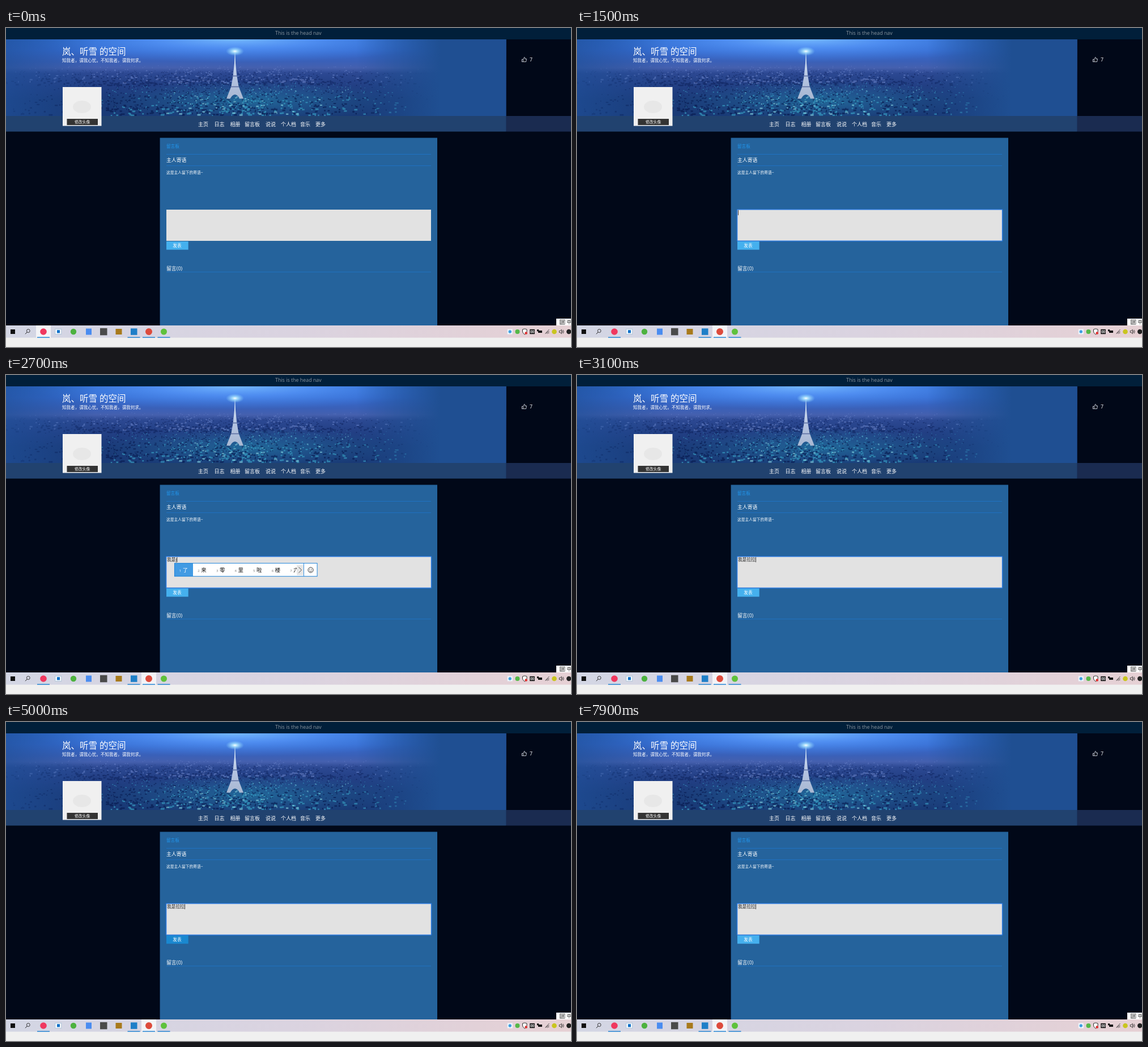
Recreate the animation shown at these times as an HTML page. Size 997x562 px, loop 8 s.

```html
<!DOCTYPE html>
<html lang="zh-CN">
<head>
<meta charset="utf-8">
<title>留言板</title>
<style>
html, body { margin: 0; width: 100%; height: 100%; overflow: hidden; background: #010818; }
svg { display: block; width: 997px; height: 562px; font-family: "Open Sans", "Noto Sans CJK SC", "Noto Sans CJK JP", sans-serif; }
text { white-space: pre; }
</style>
</head>
<body>
<svg id="stage" viewBox="0 0 997 562">
  <defs>
    <linearGradient id="sky" x2="0" y2="1">
      <stop offset="0" stop-color="#2f6cd0"/><stop offset=".12" stop-color="#356bd0"/>
      <stop offset=".24" stop-color="#3a60b8"/><stop offset=".31" stop-color="#4560ae"/>
      <stop offset=".37" stop-color="#2c4892"/><stop offset=".5" stop-color="#223f84"/>
      <stop offset=".65" stop-color="#1a3a78"/><stop offset="1" stop-color="#183a74"/>
    </linearGradient>
    <radialGradient id="glow" gradientUnits="userSpaceOnUse" cx="404" cy="0" r="370" gradientTransform="matrix(1 0 0 .11 0 20)">
      <stop offset="0" stop-color="#74b8ff"/><stop offset=".4" stop-color="#5797fa" stop-opacity=".75"/>
      <stop offset="1" stop-color="#4583e6" stop-opacity="0"/>
    </radialGradient>
    <radialGradient id="streets">
      <stop offset="0" stop-color="#2a98bc" stop-opacity=".5"/><stop offset="1" stop-color="#2a7cb0" stop-opacity="0"/>
    </radialGradient>
    <radialGradient id="star">
      <stop offset="0" stop-color="#fff"/><stop offset=".3" stop-color="#b8f0ff" stop-opacity=".8"/>
      <stop offset="1" stop-color="#8fd8ff" stop-opacity="0"/>
    </radialGradient>
    <linearGradient id="sides">
      <stop offset="0" stop-color="#1f4f98" stop-opacity=".7"/><stop offset=".18" stop-color="#1f4f98" stop-opacity="0"/>
      <stop offset=".7" stop-color="#1f4f92" stop-opacity="0"/><stop offset=".87" stop-color="#1f4f92"/>
      <stop offset="1" stop-color="#1f4f92"/>
    </linearGradient>
    <linearGradient id="tower" x2="0" y2="1">
      <stop offset="0" stop-color="#eaf7ff"/><stop offset=".55" stop-color="#b4c4e2"/><stop offset="1" stop-color="#a9b8d2"/>
    </linearGradient>
    <linearGradient id="bar">
      <stop offset="0" stop-color="#d3d6e4"/><stop offset=".5" stop-color="#dad3e0"/><stop offset="1" stop-color="#e6d0d4"/>
    </linearGradient>
  </defs>
  <g id="page"></g>
  <g id="live"></g>
</svg>
<script>
const $ = id => document.getElementById(id);
const rect = (x, y, w, h, fill, more = '') =>
  `<rect x="${x}" y="${y}" width="${w}" height="${h}" fill="${fill}" ${more}/>`;
const dot = (x, y, r, fill, more = '') => `<circle cx="${x}" cy="${y}" r="${r}" fill="${fill}" ${more}/>`;
const line = (d, color, width = 1) => `<path d="${d}" fill="none" stroke="${color}" stroke-width="${width}"/>`;
// Text placed by the middle of its line
const text = (x, mid, size, str, fill = '#fff', more = '') =>
  `<text x="${x}" y="${mid + size * .37}" font-size="${size}" fill="${fill}" ${more}>${str}</text>`;

let seed = 7;
const rand = () => (seed = seed * 16807 % 2147483647) / 2147483647;

function cityLights() {
  const layer = (color, count, opacity, left, right, top, bottom) => {
    let d = '';
    for (let i = 0; i < count; i++) {
      const depth = rand(), w = 1 + depth * 6 * rand();
      const x = left + (right - left) * (rand() + rand()) / 2, y = top + (bottom - top) * depth;
      d += `M${x.toFixed(1)} ${y.toFixed(1)}h${w.toFixed(1)}v${(.8 + depth * 2).toFixed(1)}h-${w.toFixed(1)}z`;
    }
    return `<path d="${d}" fill="${color}" opacity="${opacity}"/>`;
  };
  return layer('#0a1f58', 700, .5, -60, 740, 74, 100) + layer('#7d94da', 300, .45, -40, 760, 66, 96)
    + layer('#06164a', 800, .6, -20, 760, 92, 152) + layer('#3fb4d4', 420, .55, 100, 740, 96, 153)
    + layer('#8fe0ea', 90, .6, 240, 620, 96, 153);
}

function banner() {
  return rect(0, 20, 882.5, 162, 'url(#sky)') + rect(0, 20, 882.5, 45, 'url(#glow)')
    + '<ellipse cx="430" cy="128" rx="260" ry="36" fill="url(#streets)"/>' + cityLights()
    + rect(0, 20, 882.5, 162, 'url(#sides)')
    + '<path d="M404 38L405 62L407.3 84L410.6 103L419 124.5H412.5Q404 110 395.5 124.5H389L397.4 103L400.7 84L403 62Z" fill="url(#tower)"/>'
    + line('M396.5 103.5H411.5M399.5 84.5H408.5', '#5a6da0', 1.4)
    + '<ellipse cx="404" cy="41" rx="16" ry="8" fill="url(#star)"/>'
    + rect(0, 155, 882.5, 27.5, '#21426f') + rect(882.5, 155, 114.5, 27.5, '#1a2b50');
}

function header() {
  const menu = [[339, '主页'], [367.5, '日志'], [395.5, '相册'], [421, '留言板'], [458, '说说'],
    [485, '个人档'], [519, '音乐'], [546, '更多']];
  return rect(0, 0, 997, 20, '#011f3a')
    + text(475, 8.8, 8.9, 'This is the head nav', '#8b959f')
    + banner()
    + text(99, 41.5, 15.5, '岚、听雪 的空间')
    + text(99, 57.5, 7.55, '知我者，谓我心忧。不知我者，谓我何求。')
    + rect(100, 104, 68.5, 68.5, '#f0f0f0')
    + '<ellipse cx="134" cy="139" rx="16" ry="11" fill="#e7e7e7"/>'
    + rect(107.5, 160, 54.5, 11, '#333') + text(121, 165.5, 6.8, '修改头像')
    + menu.map(([x, s]) => text(x, 169.2, 9, s)).join('')
    + line('M910.3 55.3H912.6V59.5H910.3ZM912.6 55.3L914.6 51.4Q916.4 51.4 915.7 54.4H918.6L917.6 59.5H912.6', '#e8eaf0', .8)
    + text(924, 55.6, 8.8, '7');
}

function panel() {
  const rule = y => rect(283, y, 467, .8, '#1f77cc');
  return rect(271.6, 193.5, 489.4, 330.5, '#25639c')
    + text(283, 207.8, 7.6, '留言板', '#2196ec') + rule(222) + text(283, 232.6, 8.9, '主人寄语') + rule(242.3)
    + text(283, 254.2, 6.75, '这是主人留下的寄语~')
    + text(283, 423.5, 8.9, '留言(0)') + rule(429.5);
}

function trayAndIme() {
  const y = 535;
  return rect(971, 512, 26, 12, '#fff') + rect(977.5, 514, 8.5, 8, 'none', 'stroke="#333" stroke-width=".7"')
    + text(978.3, 518, 7, '拼', '#111') + text(989.5, 518, 8, '中', '#111')
    + rect(884.8, 530.5, 9, 9, '#eef6fc') + dot(889.3, y, 2.7, '#3f9fe0')
    + dot(902.5, y, 4, '#55b848')
    + '<path d="M911.5 531L915.3 530L919 531V535Q918.5 538 915.3 540Q912 538 911.5 535Z" fill="#fff" stroke="#222" stroke-width=".9"/>'
    + dot(917.7, 537.5, 2.3, '#e02f2f')
    + rect(924.3, 530.8, 8.6, 8.4, '#111') + line('M926 533H928V537H926ZM929.3 533H931.3V537H929.3Z', '#fff', .8)
    + rect(939, 533, 7, 4, '#111') + rect(937, 531.2, 3.2, 3.2, '#111')
    + line('M951.5 538.5L958.5 531M953 538.5Q955 535 958.5 534.5M955 538.8Q956 537 958.5 537', '#333', .8)
    + dot(967.5, y, 4.3, '#c9c51f')
    + '<path d="M976.3 533.5H978L980.3 531.3V538.7L978 536.5H976.3Z" fill="none" stroke="#222" stroke-width=".8"/>'
    + line('M981.5 533Q983 535 981.5 537M983 531.7Q985.3 535 983 538.3', '#222', .7)
    + dot(993.2, y, 4.2, '#222');
}

function icons() {
  const y = 535;
  return rect(8, 531, 8, 8, '#111')
    + dot(39.3, 533.6, 2.9, 'none', 'stroke="#222" stroke-width=".9"') + line('M37.2 535.8L34 539.2', '#222', 1)
    + dot(66, y, 5.8, '#f0385f')
    + rect(86.8, 530.3, 11, 9, '#f4f8fc', 'stroke="#9fb8d0" stroke-width=".7"') + rect(90, 532.2, 5, 5.2, '#0a6fc8')
    + dot(119, y, 5.2, '#4db23f')
    + rect(141, 529.5, 10, 11, '#4a8cf0')
    + rect(166, 528.8, 12.5, 12.5, '#4a4a4a')
    + rect(193.5, 530, 11, 10, '#a87a1c')
    + rect(220, 529.3, 11.5, 11.5, '#1f7fc8')
    + dot(252, y, 6, '#dd4b3c')
    + dot(278.5, y, 5.5, '#5fc23c');
}

const pairs = '我是 我说 我数 我上 涡扇 我试 卧室';
// time, committed text, pinyin, candidates, options
const steps = [
  [1500, '', ''],
  [1900, '', 'w', '我 为 无 问 万 位 玩', { soft: true }],
  [2000, '', 'w', '我 为 无 问 万 位 玩'],
  [2100, '', 'wo', '我 握 窝 卧 沃 涡 喔'],
  [2300, '', "wo's", pairs],
  [2400, '', "wo'sh", pairs + ' 握', { bare: true }],
  [2500, '', "wo'sh", pairs],
  [2600, '我是', ''],
  [2700, '我是', 'l', '了 来 零 里 啦 楼 六', { soft: true }],
  [2800, '我是', "la'la", '拉拉 啦啦 拉拉队 啦啦队 拉啦 啦拉 垃啦', { tip: true }],
  [3100, '我是拉拉', ''],
];
const blinks = [3600, 4000, 4500, 5000, 5500, 6000, 6400, 6900, 7400, 7900];

function candidates(x, list, { soft, bare, tip } = {}) {
  const top = 331.7, mid = 343.7, blue = '#0a78d7';
  let end = x, cells = '';
  list.split(' ').forEach((word, i) => {
    if (i === 7) { cells += text(end + 11, mid, 9.4, word, '#111'); return; }
    const w = 23.2 + 9.4 * word.length;
    if (!i) cells += rect(x, top, w, 23, soft ? '#429be3' : blue);
    cells += text(end + 8.3, mid + .8, 6, i + 1, i ? '#777' : '#fff')
      + text(end + 14.3, mid, 9.4, word, i ? '#111' : '#fff');
    end += w;
  });
  const width = end + 23.5 - x, height = tip ? 38 : 23;
  let out = rect(x, top, width, height, '#fff') + cells;
  if (!bare) {
    out += rect(end - 12.5, top + 3, 12, 18, '#e6e6e6') + line(`M${end - 9} 338.5l5 5-5 5`, '#444', .9)
      + rect(end - .4, top, .8, 23, blue)
      + dot(end + 12, 343.5, 4.6, 'none', 'stroke="#222" stroke-width=".9"')
      + dot(end + 10.3, 342.2, .7, '#222') + dot(end + 13.7, 342.2, .7, '#222')
      + line(`M${end + 9.4} 344.8q2.6 2.8 5.2 0`, '#222', .8);
  }
  if (tip) out += rect(x, top + 23, width, 15, '#f2f2f2') + text(x + 8.5, top + 30.5, 6.5, '按 Tab 键可筛选', '#666');
  return out + rect(x, top, width, height, 'none', `stroke="${blue}" stroke-width=".9"`);
}

function taskbar(focused) {
  return rect(0, 524, 997, 22, 'url(#bar)') + rect(0, 545.6, 997, 16.4, '#f0f0f0')
    + rect(focused ? 239 : 53, 524, 26, 21.5, '#f3f3f6')
    + [66, 225.5, 252, 278.5].map(x => rect(x - 11, 544.4, 22, 1.3, '#0a78d0')).join('')
    + icons() + trayAndIme();
}

function tooltip(t) {
  const shown = t < 900 ? Math.floor((t - 300) / 100) / 4 : 1 - Math.floor((t - 800) / 100) / 3;
  const opacity = Math.max(0, Math.min(1, shown));
  if (!opacity) return '';
  return `<g opacity="${opacity}">` + rect(924.3, 60.3, 33.4, 10.4, '#fff', 'stroke="#777" stroke-width=".6"')
    + text(928.6, 65.4, 6.2, '点赞数量', '#575757') + '</g>';
}

function render(t) {
  const focused = t >= 1500;
  const hover = t >= 3900 && t < 6700;
  const step = steps.filter(s => s[0] <= t).pop();
  let out = taskbar(focused) + rect(283, 320, 467, 55, '#e2e2e2')
    + rect(283, 376, 38.7, 14.6, !hover ? '#45b0ee' : t >= 4400 && t < 4500 ? '#30a0e0' : '#1a88d0')
    + text(294.3, 383.6, 7.7, '发表') + tooltip(t);
  if (focused) {
    const [, done, pinyin, list, options] = step;
    out += rect(282.6, 319.8, 468, 55.4, 'none', 'rx=".6" stroke="#2a78dc" stroke-width="1.5"')
      + text(284, 325.3, 7.7, `${done}<tspan font-size="7.2" text-decoration="underline">${pinyin}</tspan>`, '#222', 'id="entry"');
    if (list) out += candidates(done ? 297.4 : 283, list, options);
  }
  $('live').innerHTML = out;
  if (focused && blinks.filter(b => b <= t).length % 2 === 0) {
    const x = 284.2 + $('entry').getComputedTextLength();
    $('live').insertAdjacentHTML('beforeend', rect(x, 320.8, .8, 9, '#111'));
  }
}

$('page').innerHTML = rect(0, 0, 997, 562, '#010818') + header() + panel();
function frame(now) {
  render(now % 8000);
  requestAnimationFrame(frame);
}
render(0);
requestAnimationFrame(frame);
</script>
</body>
</html>
```
